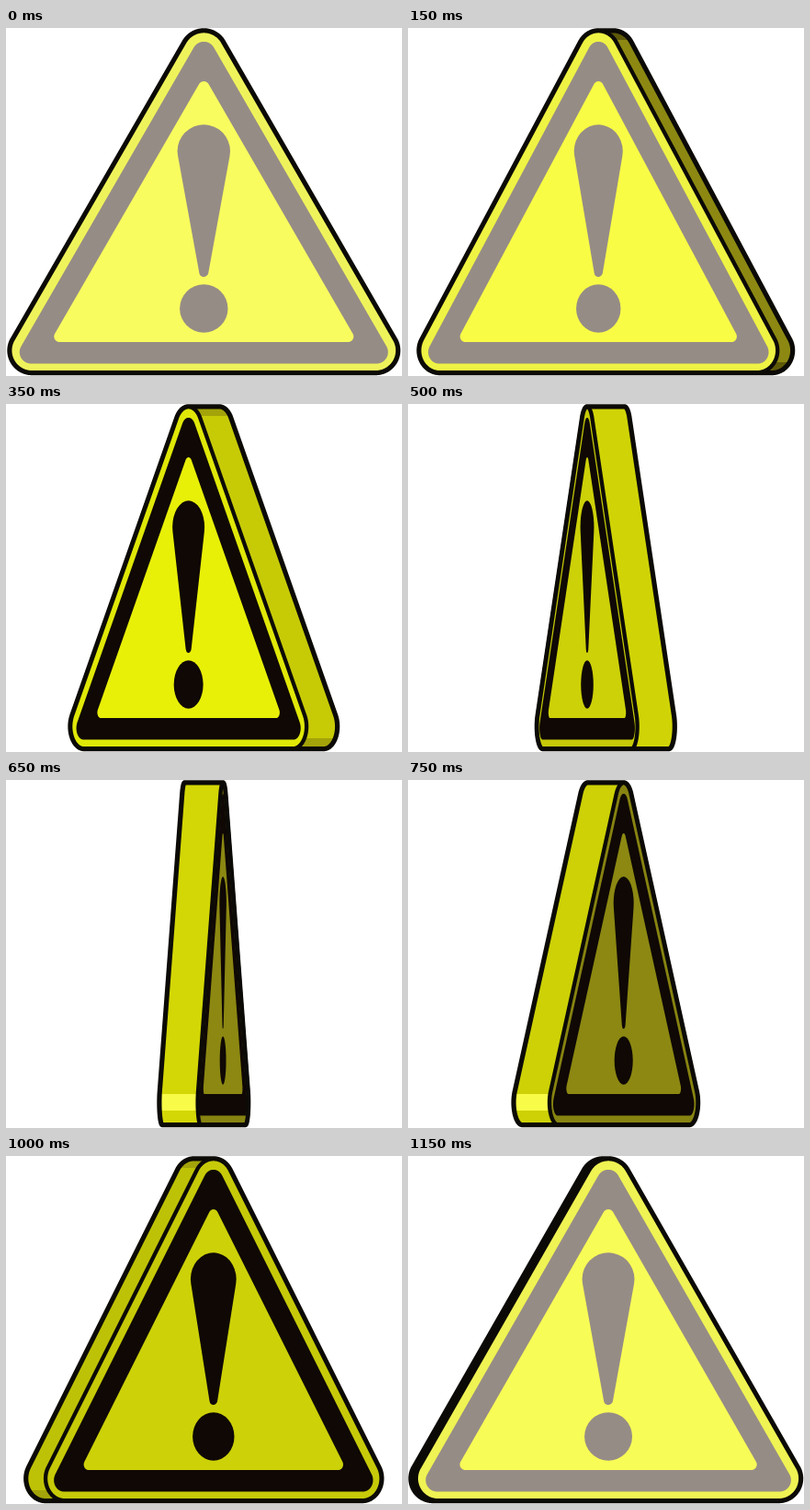
Recreate the animation shown at these times as an HTML page with a canvas. Size 431 px wide and 379 px high, loop 1.2 s.

```html
<!DOCTYPE html>
<html lang="en">
<head>
<meta charset="utf-8">
<title>Turning warning sign</title>
<style>
  html, body { margin: 0; width: 100%; height: 100%; overflow: hidden; background: #fff; }
  canvas { display: block; }
</style>
</head>
<body>
<canvas id="stage" width="431" height="379"></canvas>
<script>
const ctx = document.getElementById('stage').getContext('2d');
const LOOP = 1200, STEP = 50, MID = 215.3, DEPTH = 42;
const LINE = '#0c0a06', INK = '#0f0805', GREY = '#968c86';
const BRIGHT = '#e8f008', MEDIUM = '#cdd108', OLIVE = '#8c8812';
const TAU = Math.PI * 2;

// Rounded equilateral triangle: corner centres at half width w, top and base heights, radius r.
// The outline is widened sideways by half the spread, which gives the swept prism.
function triangle(w, top, base, r, cx, squash, spread = 0) {
  const path = new Path2D();
  const n = 360;
  for (let i = 0; i < n; i++) {
    const a = (i + 0.5) / n * TAU, deg = (i + 0.5) / n * 360;
    const corner = deg < 90 ? [w, base] : deg < 210 ? [-w, base] : deg < 330 ? [0, top] : [w, base];
    const x = corner[0] + r * Math.cos(a), y = corner[1] + r * Math.sin(a);
    path.lineTo(cx + x * squash + Math.sign(Math.cos(a)) * spread / 2, y);
  }
  path.closePath();
  return path;
}

const outer = (r, cx, squash, spread) => triangle(187, 27.2, 351.2, r, cx, squash, spread);

function paint(path, fill) {
  ctx.fillStyle = fill;
  ctx.fill(path);
}

function outline(path, width) {
  ctx.strokeStyle = LINE;
  ctx.lineWidth = width;
  ctx.lineJoin = 'round';
  ctx.stroke(path);
}

function faceLook(turn) {
  const off = Math.abs(turn - 17);
  if (off < 30) return [`rgb(248,252,${Math.round(94 - 1.1 * Math.abs(turn))})`, GREY];
  return [off < 42 ? BRIGHT : off < 68 ? MEDIUM : OLIVE, INK];
}

function sideFill(turn) {
  if (Math.abs(turn) > 80) return LINE;
  if (turn < -50) return OLIVE;
  const g = Math.round(218 - 0.4 * Math.abs(turn));
  return `rgb(${g - 4},${g},6)`;
}

function drawSide(turn, squash, spread) {
  const body = outer(24.4, MID, squash, spread);
  paint(body, sideFill(turn));
  ctx.save();
  ctx.clip(body);
  const band = (y, h, fill) => {
    ctx.fillStyle = fill;
    ctx.fillRect(0, y, 431, h);
  };
  if (Math.abs(turn) > 30 && Math.abs(turn) < 80) {
    const shade = turn < -50 ? '#5e5a08' : '#a3a30a';
    band(0, 13, shade);
    band(364, 15, shade);
  }
  if (turn > -11 && turn < 45) band(342, 18, '#f8fc48');
  ctx.restore();
  outline(body, 5.2);
}

function drawMark(cx, squash, ink) {
  const tilt = Math.asin((29 - 5) / 132);
  ctx.save();
  ctx.translate(cx, 0);
  ctx.scale(squash, 1);
  ctx.fillStyle = ink;
  ctx.beginPath();
  ctx.arc(0, 134, 28.7, Math.PI - tilt, TAU + tilt);
  ctx.arc(0, 266, 5, tilt, Math.PI - tilt);
  ctx.fill();
  ctx.beginPath();
  ctx.arc(0, 305.5, 26.2, 0, TAU);
  ctx.fill();
  ctx.restore();
}

function drawFace(turn, squash, cx) {
  const [yellow, ink] = faceLook(turn);
  const plate = outer(24, cx, squash);
  paint(plate, yellow);
  paint(plate, 'rgba(0,0,0,0.035)');
  paint(triangle(188, 27.4, 353, 12.5, cx, squash), ink);
  paint(triangle(157, 64.1, 336, 6, cx, squash), yellow);
  drawMark(cx, squash, ink);
  outline(plate, 4.3);
}

function draw(time) {
  const deg = Math.floor(time % LOOP / STEP + 0.001) * STEP / LOOP * 180;
  const rad = deg * Math.PI / 180;
  const squash = Math.max(Math.abs(Math.cos(rad)), 0.0001);
  const spread = DEPTH * Math.sin(rad);
  const first = deg < 90;
  ctx.fillStyle = '#fff';
  ctx.fillRect(0, 0, 431, 379);
  drawSide(deg - 90, squash, spread);
  drawFace(first ? deg : deg - 180, squash, MID + (first ? -spread : spread) / 2);
}

function tick() {
  draw(performance.now());
  requestAnimationFrame(tick);
}
tick();
</script>
</body>
</html>
```
